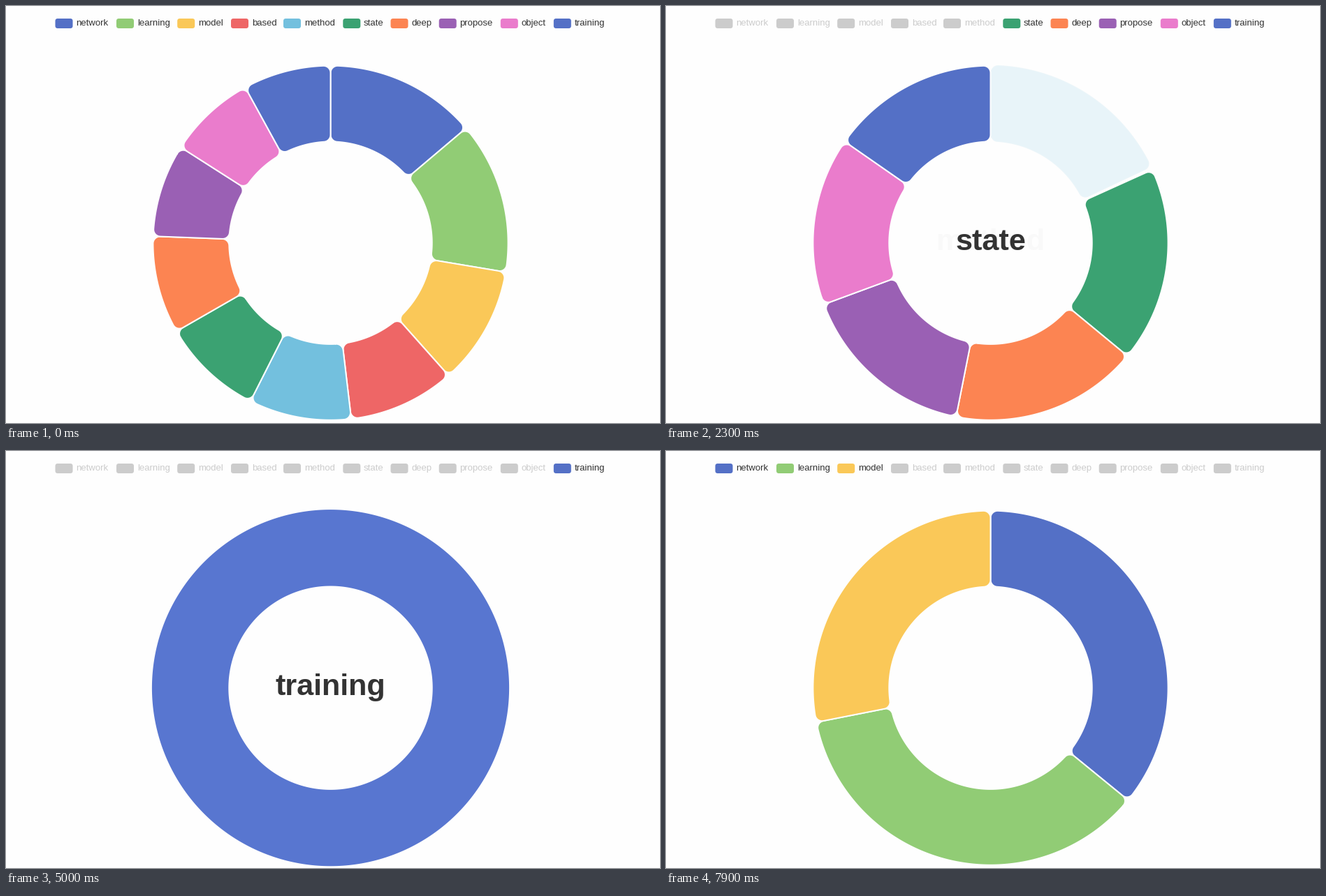
A matplotlib script that plays this animation: 936x598 px, repeating every 8000 ms.

```python
import numpy as np
import matplotlib.pyplot as plt
from matplotlib.animation import FuncAnimation
from matplotlib.colors import to_rgb
from matplotlib.patches import FancyBboxPatch, PathPatch
from matplotlib.path import Path

W, H, DPI = 936, 598, 100
PX = 72 / DPI
CX, CY = 464.5, 339.7
R_IN, R_OUT, CORNER, GROW = 145.2, 254.1, 10, 5
STEP, FRAMES = 100, 80
MOVE, HOVER, FADE = 500, 300, 130
OFF = "#cccccc"
FONT = "Liberation Sans"

# label, share in degrees, colour, legend x
ITEMS = [
    ("network", 49.7, "#5470c6", 70.5),
    ("learning", 49.8, "#91cc75", 158),
    ("model", 38.9, "#fac858", 245.2),
    ("based", 34.9, "#ee6666", 322),
    ("method", 33.5, "#73c0de", 397),
    ("state", 33.3, "#3ba272", 482.3),
    ("deep", 32.05, "#fc8452", 550.5),
    ("propose", 30.45, "#9a60b4", 619.7),
    ("object", 28.7, "#ea7ccc", 707.8),
    ("training", 28.7, "#5470c6", 783.8),
]
N = len(ITEMS)
SHARE = np.array([item[1] for item in ITEMS])

# legend clicks: (time, item); each one toggles its item
CLICKS = [(590, 0), (990, 1), (1390, 2), (1840, 3), (2240, 4), (2645, 5),
          (3180, 6), (3500, 7), (3840, 8), (5130, 9),
          (6550, 0), (6950, 1), (7370, 2)]
# pointer over a legend entry: (item, from, to)
HOVERS = [(0, 480, 5000), (1, 770, 5000), (2, 1140, 5000), (3, 1560, 5000),
          (4, 1980, 5000), (5, 2300, 5000), (6, 3040, 5000), (7, 3330, 5000),
          (8, 3680, 5000), (9, 4938, 6000), (0, 6550, 6760), (1, 6950, 7400)]


def in_out(p):
    p = min(max(p, 0), 1)
    return 4 * p ** 3 if p < 0.5 else 1 - 4 * (1 - p) ** 3


def out(p):
    return 1 - (1 - min(max(p, 0), 1)) ** 3


def shown_after(count):
    on = np.ones(N, bool)
    for _, i in CLICKS[:count]:
        on[i] = not on[i]
    return on


def spread(on):
    """Start and end angle of every item, clockwise from the top."""
    spans = np.where(on, SHARE, 0)
    ends = np.cumsum(spans) * 360 / max(spans.sum(), 1e-9)
    return np.column_stack([np.r_[0, ends[:-1]], ends])


def angles_at(t, count):
    """Angles at time t once the first `count` clicks have happened."""
    on = shown_after(count)
    goal = spread(on)
    if count == 0:
        return goal
    start, toggled = CLICKS[count - 1]
    stop = CLICKS[count][0] if count < len(CLICKS) else np.inf
    before = angles_at(start, count - 1)
    if on[toggled]:
        before[toggled] = 0
    goal[~on] = before[~on]
    now = before + (goal - before) * in_out((t - start) / MOVE)
    for i, h0, _ in HOVERS:
        if start <= h0 < stop and h0 <= t:
            base = before[i] + (goal[i] - before[i]) * in_out((h0 - start) / MOVE)
            now[i] = base + (goal[i] - base) * out((t - h0) / HOVER)
    return now


def emphasis(t, i):
    """Highlight strength and whether the pointer is on the item."""
    past = [(a, b) for j, a, b in HOVERS if j == i and a <= t]
    if not past:
        return 0, False
    a, b = past[-1]
    level = out((min(t, b) - a) / HOVER)
    return level * (1 - out((t - b) / HOVER)), t < b


def opacity(t, i, on):
    if on[i]:
        return 1
    gone = [c for c, j in CLICKS if j == i and c <= t][-1]
    return 1 - out((t - gone) / FADE)


def arc(cx, cy, r, a0, a1, n):
    a = np.radians(np.linspace(a0, a1, n))
    return np.column_stack([cx + r * np.sin(a), cy - r * np.cos(a)])


def closed(points):
    codes = [Path.MOVETO] + [Path.LINETO] * (len(points) - 1) + [Path.CLOSEPOLY]
    return Path(np.vstack([points, points[:1]]), codes)


def sector(a0, a1, r_out):
    span = a1 - a0
    if span > 359.9:
        return Path.make_compound_path(
            closed(arc(CX, CY, r_out, 0, 360, 361)[:-1]),
            closed(arc(CX, CY, R_IN, 360, 0, 361)[:-1]))
    s = np.sin(np.radians(min(span, 179) / 2))
    co = min(CORNER, r_out * s / (1 + s))
    ci = min(CORNER, R_IN * s / (1 - s))
    do, di = r_out - co, R_IN + ci
    ao, ai = np.degrees(np.arcsin([co / do, ci / di]))

    def corner(dist, angle, r, b0, b1):
        x, y = arc(CX, CY, dist, angle, angle, 1)[0]
        return arc(x, y, r, b0, b1, 12)

    n = int(span) + 3
    return closed(np.vstack([
        corner(do, a0 + ao, co, a0 - 90, a0 + ao),
        arc(CX, CY, r_out, a0 + ao, a1 - ao, n),
        corner(do, a1 - ao, co, a1 - ao, a1 + 90),
        corner(di, a1 - ai, ci, a1 + 90, a1 - ai + 180),
        arc(CX, CY, R_IN, a1 - ai, a0 + ai, n),
        corner(di, a0 + ai, ci, a0 + ai + 180, a0 + 270),
    ]))


fig = plt.figure(figsize=(W / DPI, H / DPI), dpi=DPI, facecolor="#fefefe")
ax = fig.add_axes([0, 0, 1, 1])
ax.set(xlim=(0, W), ylim=(H, 0))
ax.axis("off")

slices, titles, icons, names = [], [], [], []
for label, _, color, x in ITEMS:
    slices.append(ax.add_patch(PathPatch(
        sector(0, 90, R_OUT), ec="#fefefe", lw=2 * PX, joinstyle="round")))
    titles.append(ax.text(CX, 350, label, family=FONT, weight="bold",
                          size=43.3 * PX, color="#333333", ha="center",
                          va="baseline", zorder=50))
    icons.append(ax.add_patch(FancyBboxPatch(
        (x, 18), 25, 14, lw=0,
        boxstyle="round,pad=0,rounding_size=3.5")))
    names.append(ax.text(x + 29.8, 28.3, label, family=FONT, size=13.1 * PX,
                         va="baseline"))


def update(frame):
    t = frame * STEP
    count = sum(c <= t for c, _ in CLICKS)
    on = shown_after(count)
    angles = angles_at(t, count)
    for i, (_, _, color, _) in enumerate(ITEMS):
        a0, a1 = angles[i]
        alpha = opacity(t, i, on)
        level, pointed = emphasis(t, i)
        level *= alpha
        piece = slices[i]
        piece.set_visible(alpha > 0.01 and a1 - a0 > 0.5)
        if piece.get_visible():
            rgb = np.array(to_rgb(color))
            piece.set_path(sector(a0, a1, R_OUT + GROW * level))
            piece.set_facecolor(np.clip(rgb * (1 + 0.1 * level), 0, 1))
            piece.set_alpha(alpha)
            piece.set_zorder(2 + i / N + (1 if level > 0 else 0) - (not on[i]) * 3)
        titles[i].set_visible(pointed and alpha > 0.01)
        titles[i].set_alpha(alpha ** 2)
        icons[i].set_facecolor(color if on[i] else OFF)
        names[i].set_color("#333333" if on[i] else OFF)
    return slices + titles + icons + names


anim = FuncAnimation(fig, update, frames=FRAMES, interval=STEP,
                     repeat=True, repeat_delay=0, blit=False)
plt.show()
```
